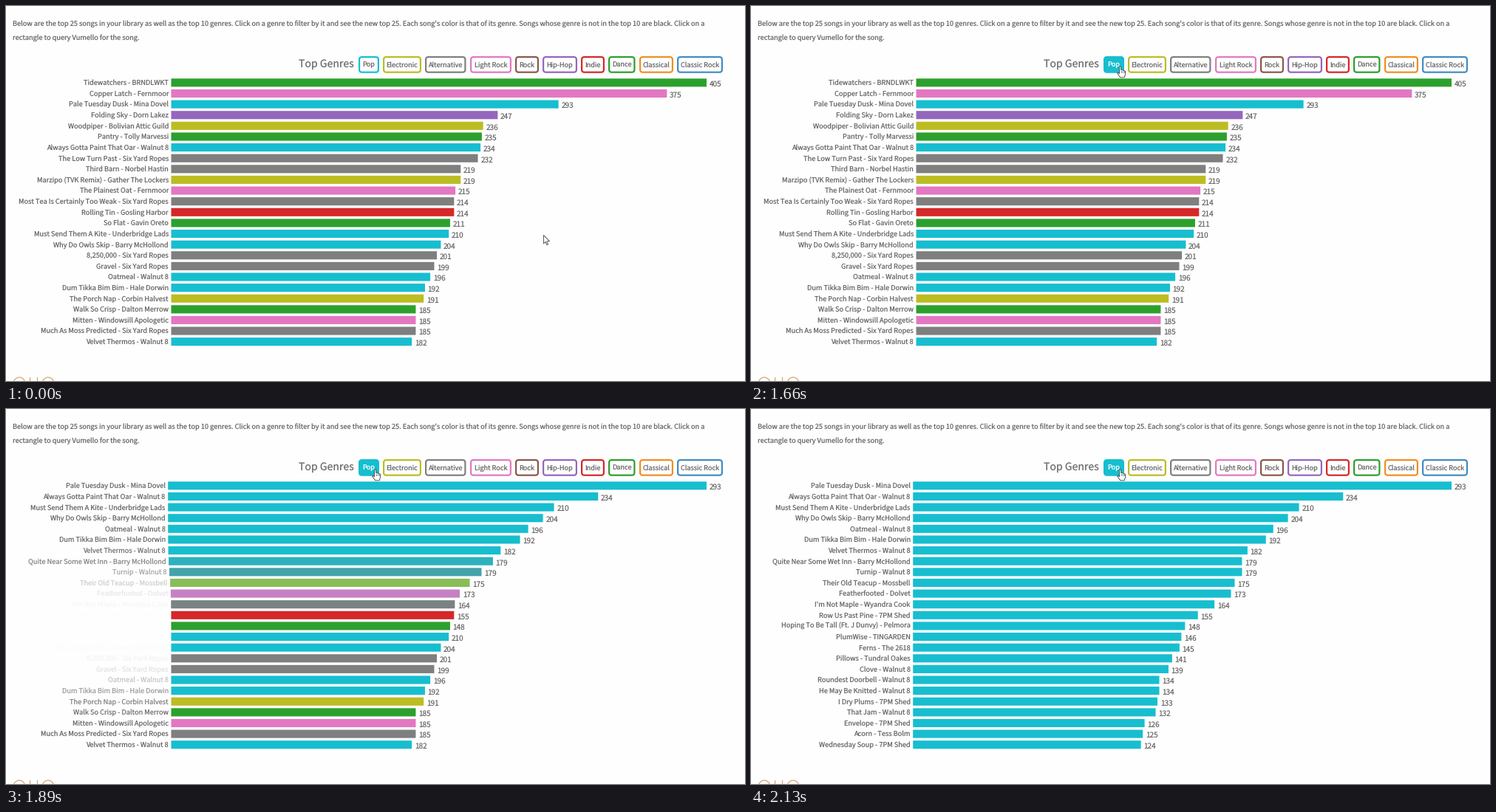
A matplotlib script that plays this animation: 1000 px wide and 508 px high, repeating every 8000 ms.

```python
import matplotlib.pyplot as plt
import numpy as np
from matplotlib.animation import FuncAnimation
from matplotlib.colors import to_rgb
from matplotlib.patches import Ellipse, FancyBboxPatch, Polygon, Rectangle

W, H, DPI = 1000, 508, 100
LOOP, STEP = 8000, 50
PT = 72 / DPI
INK = "#6a6a6a"
HEADING = "#d6a26c"
OUTLINE = "#4a4a4a"

plt.rcParams["font.family"] = ["Noto Sans CJK JP", "Liberation Sans"]
plt.rcParams["text.hinting"] = "no_hinting"

INTRO = (
    "Below are the top 25 songs in your library as well as the top 10 genres. "
    "Click on a genre to filter by it and see the new top 25. "
    "Each song's color is that of its genre. "
    "Songs whose genre is not in the top 10 are black. Click on a",
    "rectangle to query Vumello for the song.",
)

# name: left, right, colour
GENRES = {
    "Pop": (477, 505, "#17becf"),
    "Electronic": (510, 562, "#bcbd22"),
    "Alternative": (567, 622.5, "#7f7f7f"),
    "Light Rock": (628, 684, "#e377c2"),
    "Rock": (689, 721, "#8c564b"),
    "Hip-Hop": (726, 773, "#9467bd"),
    "Indie": (778, 810, "#d62728"),
    "Dance": (815, 851.5, "#2ca02c"),
    "Classical": (857, 903, "#ef8f22"),
    "Classic Rock": (908, 970, "#3f8dc2"),
}

SONGS = [
    ("Tidewatchers - BRNDLWKT", 405, "Dance"),
    ("Copper Latch - Fernmoor", 375, "Light Rock"),
    ("Pale Tuesday Dusk - Mina Dovel", 293, "Pop"),
    ("Folding Sky - Dorn Lakez", 247, "Hip-Hop"),
    ("Woodpiper - Bolivian Attic Guild", 236, "Electronic"),
    ("Pantry - Tolly Marvessi", 235, "Dance"),
    ("Always Gotta Paint That Oar - Walnut 8", 234, "Pop"),
    ("The Low Turn Past - Six Yard Ropes", 232, "Alternative"),
    ("Third Barn - Norbel Hastin", 219, "Alternative"),
    ("Marzipo (TVK Remix) - Gather The Lockers", 219, "Electronic"),
    ("The Plainest Oat - Fernmoor", 215, "Light Rock"),
    ("Most Tea Is Certainly Too Weak - Six Yard Ropes", 214, "Alternative"),
    ("Rolling Tin - Gosling Harbor", 214, "Indie"),
    ("So Flat - Gavin Oreto", 211, "Dance"),
    ("Must Send Them A Kite - Underbridge Lads", 210, "Pop"),
    ("Why Do Owls Skip - Barry McHollond", 204, "Pop"),
    ("8,250,000 - Six Yard Ropes", 201, "Alternative"),
    ("Gravel - Six Yard Ropes", 199, "Alternative"),
    ("Oatmeal - Walnut 8", 196, "Pop"),
    ("Dum Tikka Bim Bim - Hale Dorwin", 192, "Pop"),
    ("The Porch Nap - Corbin Halvest", 191, "Electronic"),
    ("Walk So Crisp - Dalton Merrow", 185, "Dance"),
    ("Mitten - Windowsill Apologetic", 185, "Light Rock"),
    ("Much As Moss Predicted - Six Yard Ropes", 185, "Alternative"),
    ("Velvet Thermos - Walnut 8", 182, "Pop"),
]

MORE_POP = [
    ("Quite Near Some Wet Inn - Barry McHollond", 179),
    ("Turnip - Walnut 8", 179),
    ("Their Old Teacup - Mossbell", 175),
    ("Featherfooted - Dolvet", 173),
    ("I'm Not Maple - Wyandra Cook", 164),
    ("Row Us Past Pine - 7PM Shed", 155),
    ("Hoping To Be Tall (Ft. J Dunvy) - Pelmora", 148),
    ("PlumWise - TINGARDEN", 146),
    ("Ferns - The 2618", 145),
    ("Pillows - Tundral Oakes", 141),
    ("Clove - Walnut 8", 139),
    ("Roundest Doorbell - Walnut 8", 134),
    ("He May Be Knitted - Walnut 8", 134),
    ("I Dry Plums - 7PM Shed", 133),
    ("That Jam - Walnut 8", 132),
    ("Envelope - 7PM Shed", 126),
    ("Acorn - Tess Bolm", 125),
    ("Wednesday Soup - 7PM Shed", 124),
]

POP_SONGS = [s for s in SONGS if s[2] == "Pop"]
POP_SONGS += [(title, plays, "Pop") for title, plays in MORE_POP]

# Screen refresh times of the pointer move and of the bar transition
MOVES = [70, 150, 230, 310, 380, 460, 540, 610]
HOVER = 860
SWAPS = [1660, 1740, 1830, 1890, 1970, 2050, 2130]

ROW0, PITCH, BAR_H = 98.3, 14.62, 11.1
LEFT = (223.5, 219.2)
RIGHT = 948

fig = plt.figure(figsize=(W / DPI, H / DPI), dpi=DPI, facecolor="#fefefe")
ax = fig.add_axes([0, 0, 1, 1])
ax.set_xlim(0, W)
ax.set_ylim(H, 0)
ax.axis("off")


def write(x, y, text, px=9.22, ha="left", color=INK):
    return ax.text(x, y, text, fontsize=px * PT, ha=ha, va="baseline",
                   color=color, parse_math=False)


def ease(u):
    """Cubic in-out."""
    u = min(max(u, 0), 1)
    return 4 * u**3 if u < 0.5 else 1 - 4 * (1 - u) ** 3


def mix(a, b, k):
    return a + (b - a) * k


def shape(points):
    patch = Polygon(points, closed=True, facecolor="white", edgecolor=OUTLINE,
                    lw=0.9 * PT, joinstyle="round", zorder=5)
    return ax.add_patch(patch)


# Page text
write(9, 27.6, INTRO[0])
write(9, 47, INTRO[1])
write(396, 83, "Top Genres", 14.1)

# Heading cut off by the lower edge
for cx in (18, 57):
    ax.add_patch(Ellipse((cx, 512), 16, 18, fill=False, ec=HEADING, lw=1.2 * PT))
for x in (32, 42):
    ax.plot([x, x], [503, 515], color=HEADING, lw=1.2 * PT)

# Genre buttons
buttons = {}
for name, (x0, x1, color) in GENRES.items():
    box = FancyBboxPatch((x0 + 1.1, 69.1), x1 - x0 - 2.2, 20.6,
                         boxstyle="round,pad=0,rounding_size=3.5",
                         facecolor="white", edgecolor=color, lw=2.2 * PT)
    ax.add_patch(box)
    buttons[name] = box, write((x0 + x1) / 2, 83, name, 9.1, "center")


class Row:
    """One bar with its label and play count, before and after filtering."""

    def __init__(self, i, old, new):
        self.old, self.new = old, new
        y = ROW0 + i * PITCH
        self.colors = [np.array(to_rgb(GENRES[s[2]][2])) for s in (old, new)]
        scales = [(RIGHT - left) / top[0][1]
                  for left, top in zip(LEFT, (SONGS, POP_SONGS))]
        self.ends = [left + s[1] * k for left, s, k in zip(LEFT, (old, new), scales)]
        self.bar = ax.add_patch(Rectangle((0, y), 1, BAR_H, lw=0, snap=False))
        self.label = write(0, y + 8.8, "", ha="right")
        self.count = write(0, y + 10.8, "", 10)

    def update(self, u):
        k = ease(u)
        left, end = mix(*LEFT, k), mix(*self.ends, k)
        self.bar.set_x(left)
        self.bar.set_width(end - left)
        self.bar.set_facecolor(mix(*self.colors, k))
        song = self.new if u > 0 else self.old
        self.label.set_text(song[0])
        self.label.set_x(left - 3.5)
        self.label.set_alpha(k if u > 0 else 1 - ease(u + 1))
        self.count.set_text(str(song[1]))
        self.count.set_x(end + 3.8)


rows = [Row(i, a, b) for i, (a, b) in enumerate(zip(SONGS, POP_SONGS))]

# Pointers
ARROW = np.array([(0.5, 0.5), (0.5, 11.8), (3, 9.5), (4.8, 13.6), (6.5, 12.8),
                  (4.8, 8.9), (8.4, 8.6)])
HAND = np.array([(3.6, 1.3), (4.5, 0.5), (5.6, 1.3), (5.8, 5.6), (8, 5.8),
                 (10, 6.6), (11.6, 7.6), (11.6, 11.5), (10.2, 15.8), (4.8, 15.8),
                 (0.8, 10.4), (1.2, 9), (3.6, 10.6)])
arrow = shape(ARROW)
hand = [shape(HAND + (495, 81))]
hand += ax.plot([[501, 503, 505]] * 2, [[87.5] * 3, [90] * 3],
                color=OUTLINE, lw=0.7 * PT, zorder=6)

START, BEND, STOP = np.array([(727, 310), (600, 213), (500, 82)])


def passed(times, t):
    return sum(t >= s for s in times)


def update(frame):
    t = frame * STEP + STEP - 5

    n = passed(MOVES, t) / len(MOVES)
    s = n * n * (3 - 2 * n)
    tip = START * (1 - s) ** 2 + BEND * 2 * s * (1 - s) + STOP * s * s
    arrow.set_xy(ARROW + np.round(tip))
    arrow.set_visible(t < HOVER)
    for part in hand:
        part.set_visible(t >= HOVER)

    swaps = passed(SWAPS, t)
    box, text = buttons["Pop"]
    box.set_facecolor(GENRES["Pop"][2] if swaps else "white")
    text.set_color("white" if swaps else INK)

    # Each row starts a little after the one above it
    phase = -1.93 + 0.81 * swaps
    for i, row in enumerate(rows):
        row.update(phase - 0.098 * i)
    return []


anim = FuncAnimation(fig, update, frames=LOOP // STEP, interval=STEP,
                     repeat=True, repeat_delay=0, blit=False)
plt.show()
```
